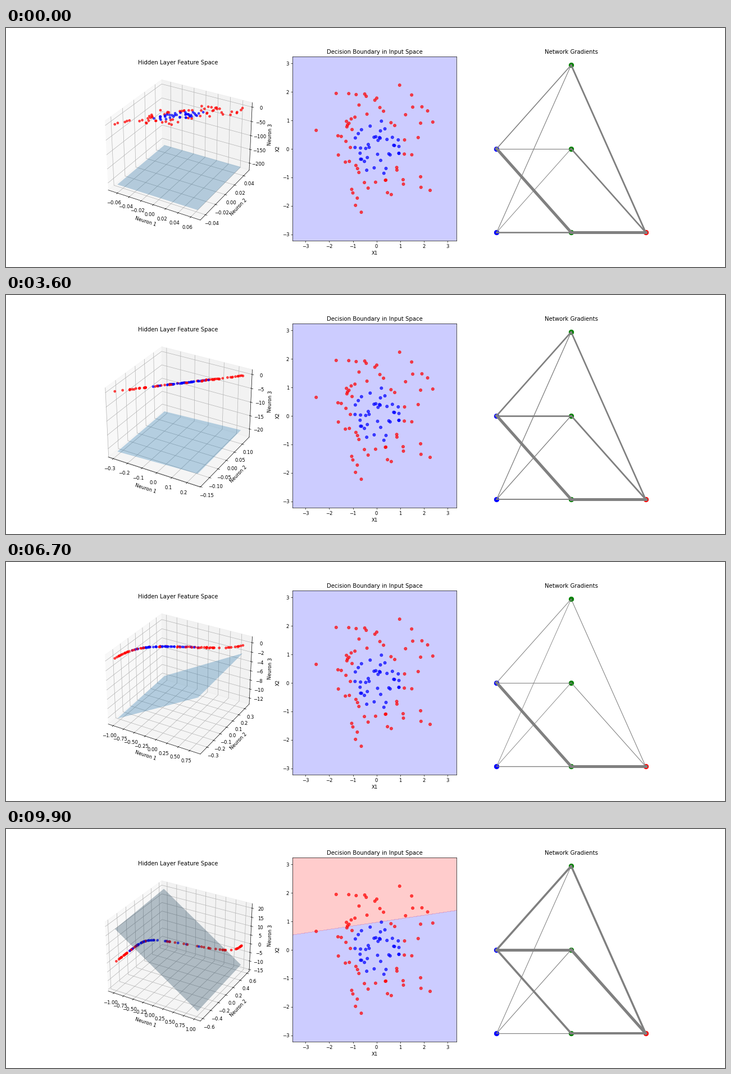
These frames come from a looping animation (1280x427 px, 10000 ms). A matplotlib script:

```python
import numpy as np
import matplotlib.pyplot as plt
from matplotlib.animation import FuncAnimation

W, H = 1280, 427
DPI = W / 21
FRAMES = 100
STEPS = 10
RATE = 0.1

# Points labelled by whether they lie outside the unit circle
np.random.seed(0)
X = np.random.randn(100, 2)
y = np.where((X ** 2).sum(axis=1) > 1, 1, -1)[:, None]


class Network:
    """2-3-1 network: tanh hidden layer, sigmoid output."""

    def __init__(self):
        np.random.seed(0)
        self.w1 = np.random.randn(2, 3) * 0.01
        self.b1 = np.zeros((1, 3))
        self.w2 = np.random.randn(3, 1) * 0.01
        self.b2 = np.zeros((1, 1))

    def forward(self, x):
        hidden = np.tanh(x @ self.w1 + self.b1)
        return hidden, 1 / (1 + np.exp(-(hidden @ self.w2 + self.b2)))

    def step(self):
        hidden, out = self.forward(X)
        err = (out - y) / len(X)
        back = (err @ self.w2.T) * (1 - hidden ** 2)
        g1, g2 = X.T @ back, hidden.T @ err
        self.w1 -= RATE * g1
        self.b1 -= RATE * back.sum(axis=0, keepdims=True)
        self.w2 -= RATE * g2
        self.b2 -= RATE * err.sum(axis=0, keepdims=True)
        return hidden, g1, g2


def span(v, pad=0):
    return v.min() - pad, v.max() + pad


gx, gy = np.meshgrid(np.linspace(*span(X[:, 0], 1), 100),
                     np.linspace(*span(X[:, 1], 1), 100))
grid = np.column_stack([gx.ravel(), gy.ravel()])


def train():
    """Collect what each frame shows."""
    net = Network()
    for _ in range(STEPS):
        net.step()
    states = []
    for _ in range(FRAMES):
        for _ in range(STEPS):
            hidden, g1, g2 = net.step()
        px, py = np.meshgrid(span(hidden[:, 0]), span(hidden[:, 1]))
        a, b, c = net.w2.ravel()
        plane = px, py, -(a * px + b * py + net.b2[0, 0]) / c
        score = net.forward(grid)[1].reshape(gx.shape)
        grads = [np.abs(g) / np.abs(g).max() for g in (g1, g2)]
        states.append((hidden, plane, score, grads))
    return states


states = train()

fig = plt.figure(figsize=((W + 1e-6) / DPI, (H + 1e-6) / DPI), dpi=DPI)
ax_hidden = fig.add_subplot(131, projection="3d")
ax_input = fig.add_subplot(132)
ax_net = fig.add_subplot(133)

dots = dict(c=y.ravel(), cmap="bwr", alpha=0.7)

ax_input.scatter(X[:, 0], X[:, 1], **dots)
ax_input.set(title="Decision Boundary in Input Space", xlabel="X1", ylabel="X2",
             xlim=span(X[:, 0], 1), ylim=span(X[:, 1], 1))

inputs = [(0, 0), (0, 0.5)]
hiddens = [(0.5, 0), (0.5, 0.5), (0.5, 1)]
output = (1, 0)
for nodes, color in ((inputs, "blue"), (hiddens, "green"), ([output], "red")):
    ax_net.scatter(*zip(*nodes), s=100, c=color)


def link(p, q):
    return ax_net.plot([p[0], q[0]], [p[1], q[1]], color="gray")[0]


links1 = [[link(p, q) for q in hiddens] for p in inputs]
links2 = [[link(p, output)] for p in hiddens]
ax_net.set_title("Network Gradients")
ax_net.axis("off")

regions = []


def draw_hidden(hidden, plane):
    ax_hidden.clear()
    ax_hidden.scatter(*hidden.T, **dots)
    ax_hidden.plot_surface(*plane, alpha=0.3)
    ax_hidden.set(title="Hidden Layer Feature Space", xlabel="Neuron 1",
                  ylabel="Neuron 2", zlabel="Neuron 3")


def draw_regions(score):
    while regions:
        regions.pop().remove()
    regions.append(ax_input.contourf(gx, gy, score, levels=[0, 0.5, 1],
                                     colors=["blue", "red"], alpha=0.2, zorder=0))


def update(i):
    hidden, plane, score, grads = states[i]
    draw_hidden(hidden, plane)
    draw_regions(score)
    for rows, grad in zip((links1, links2), grads):
        for row, values in zip(rows, grad):
            for line, value in zip(row, values):
                line.set_linewidth(1 + 5 * value)
    return []


anim = FuncAnimation(fig, update, frames=FRAMES, interval=100,
                     init_func=lambda: update(0), repeat=True, repeat_delay=0)
plt.show()
```
